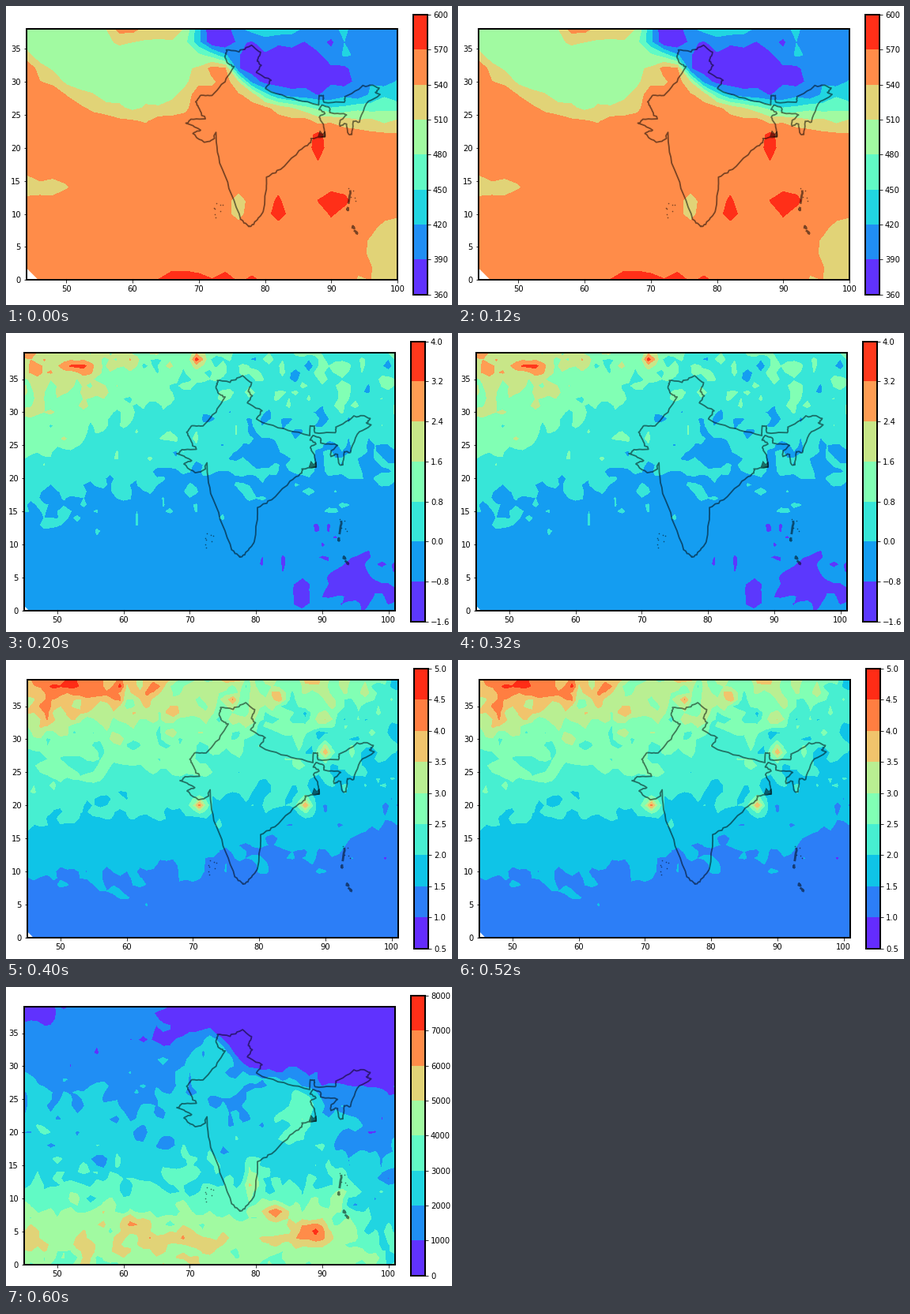
Write a matplotlib script that moves like this. It is 564x379 px and loops after 0.8 s.

```python
import numpy as np
import matplotlib.pyplot as plt
from matplotlib.animation import FuncAnimation

W, H, DPI = 564, 379, 72
PX_PER_DEG = 8.375

plt.rcParams.update({"font.family": "DejaVu Sans", "font.size": 10,
                     "axes.linewidth": 2})

# Key border vertices as (lon, lat).
NORTH = [
    (68.2, 23.7), (68.8, 24.3), (71.0, 24.4), (70.0, 25.9), (69.6, 27.0),
    (70.3, 28.0), (72.0, 27.9), (73.9, 30.0), (75.3, 32.3), (74.3, 32.8),
    (74.0, 33.8), (74.2, 34.8), (76.0, 34.6), (78.0, 35.5), (79.4, 34.4),
    (78.8, 33.3), (79.4, 32.5), (78.7, 31.4), (80.9, 30.2), (80.1, 28.9),
    (84.1, 27.4), (88.1, 26.5), (88.2, 27.9), (88.8, 27.9), (88.9, 26.9)]
EAST = [
    (92.0, 26.9), (92.1, 27.7), (94.6, 29.2), (96.2, 29.5), (97.3, 29.0),
    (96.7, 28.4), (97.4, 28.0), (95.3, 26.7), (94.2, 23.9), (93.4, 24.0),
    (93.1, 22.1), (92.6, 22.0), (92.2, 23.7), (91.3, 23.2), (91.3, 24.1),
    (92.4, 25.0), (89.9, 25.3), (89.7, 26.1), (88.5, 26.5), (88.2, 25.8),
    (89.0, 25.2), (88.1, 24.6), (88.8, 23.6), (89.1, 21.7)]
SOUTH = [
    (87.0, 21.4), (86.8, 20.6), (85.2, 19.6), (82.3, 16.7), (80.3, 15.6),
    (80.1, 13.2), (79.8, 10.4), (79.0, 9.3), (78.1, 8.3), (77.5, 8.1),
    (76.5, 9.2), (74.6, 13.8), (72.9, 18.7), (72.5, 22.3), (72.2, 21.2),
    (70.8, 20.8), (69.1, 22.2), (70.3, 22.8), (68.2, 23.7)]


def step(a, centre, width):
    """Smooth rise from 0 to 1."""
    return 1 / (1 + np.exp(-(a - centre) / width))


def ridge(x):
    """Latitude of the mountain front."""
    return 26 + 8.5 * np.exp(-np.clip(x - 73.5, 0, None) / 5)


def bent_slope(distance, slope):
    """Climb north of a front, flatten out south of it."""
    return 2 + np.where(distance > 0, slope * distance,
                        np.maximum(.06 * distance, -.48))


# Base fields, measured in colour bands.
def upper_air(x, y):
    east = step(x, 70, 1.2)
    cold = east * step(y, ridge(x) - .3, .7 + .8 * step(x, 92, 2))
    mild = (1 - east) * step(y, 25.4 + .035 * (x - 60) ** 2, .8)
    return 6.5 - 2.1 * mild - cold * (5.9 - step(x + y, 124.5, .8))


def north_west_rise(x, y):
    front = 16.5 + 4.5 * step(x, 56, 4)
    slope = .042 + .1 * (1 - step(x, 66, 4))
    return bent_slope(np.minimum(y - front, 19), slope)


def north_rise(x, y):
    front = 10 + 4 * step(x, 74, 1.5) + 5 * step(x, 96, 2)
    return bent_slope(y - front, .125 - .03 * step(x, 92, 3))


def south_rise(x, y):
    profile = np.interp(y, (0, 4, 10, 16, 26, 39), (4.3, 4.7, 3.4, 2.5, 2, 1.3))
    return profile - 1.3 * step(x, 67, 2) * step(y, ridge(x) + 1, .6)


# Bumps are (lon, lat, height, width, depth); noise goes from south to north.
MAPS = [
    dict(box=(26, 29), lon=(44, 100), lat=(0, 38), cell=2, bar_x=515,
         scale=(360, 600, 8), base=upper_air, noise=(.17, .17, .3),
         corner=1.7, seed=4,
         bumps=[(61, 39, 2.2, 6, 3), (81, 39, 2.6, 5, 3), (72, 37, -2, 2, 3),
                (100, 4, -1, 6, 8), (46, 14, -1, 5, 2), (71, 0, .8, 10, 1.8),
                (91, 12, .7, 3.5, 2.5), (88, 20, .9, 1.2, 3),
                (76, 11, -1.1, 1.3, 2.2), (82, 11, .9, 1, 2.2)]),
    dict(box=(23, 25), lon=(45, 101), lat=(0, 39), cell=1, bar_x=512,
         scale=(-1.6, 4, 7), base=north_west_rise, noise=(.15, .25, .48),
         corner=.6, seed=7,
         bumps=[(96, 4, -.6, 15, 6.5), (53, 37, 1.6, 2.5, 1),
                (71, 38, 3, 1, 1), (88, 37, -2, 1, 1)]),
    dict(box=(27, 25), lon=(45, 101), lat=(0, 39), cell=1, bar_x=516,
         scale=(.5, 5, 9), base=north_rise, noise=(.08, .25, .7),
         corner=.8, seed=11,
         bumps=[(50, 38, 2, 10, 3.5), (71, 20, 4.3, 1, 1), (87, 20, 3.7, 1, 1),
                (76, 36, 3, 1, 1), (83, 36, 2.5, 1, 1), (90, 28, 3, 1, 1),
                (99, 12, -.8, .7, .7)]),
    dict(box=(23, 25), lon=(45, 101), lat=(0, 39), cell=1, bar_x=512,
         scale=(0, 8000, 8), base=south_rise, noise=(.45, .36, .2),
         corner=0, seed=3,
         bumps=[(88, 5, 1.6, 3.5, 2.5), (83, 8, 2.4, 1.5, 1.5),
                (61.5, 6, 2, 2, 1.5), (67, 3.5, .8, 5, 2), (45, 4, .9, 3, 2.5),
                (101, 5, -1.7, 6, 8), (101, 22, -.9, 9, 6),
                (86, 23, 1.6, 3.5, 4), (79.5, 13, 2, 1.3, 3),
                (73, 31, .8, 3, 3), (47, 38, -.8, 4, 2),
                (65, 34, -.7, 4, 1.5), (56, 30, -.4, 9, 4)]),
]


def rough_noise(shape, seed, blurred):
    noise = np.random.default_rng(seed).normal(size=shape)
    if blurred:
        p = np.pad(noise, 1, mode="wrap")
        p = (p[:-2] + 4 * p[1:-1] + p[2:]) / 6
        noise = (p[:, :-2] + 4 * p[:, 1:-1] + p[:, 2:]) / 3
    return noise


def make_field(m):
    lon = np.arange(m["lon"][0], m["lon"][1] + 1, m["cell"])
    lat = np.arange(m["lat"][0], m["lat"][1] + 1, m["cell"])
    x, y = np.meshgrid(lon, lat)
    z = m["base"](x, y)
    for cx, cy, height, sx, sy in m["bumps"]:
        z += height * np.exp(-((x - cx) / sx) ** 2 - ((y - cy) / sy) ** 2)
    z += (rough_noise(z.shape, m["seed"], m["cell"] == 1)
          * np.interp(y, (0, 20, 38), m["noise"]))
    return lon, lat, np.clip(z, .04, m["scale"][2] - .04)


def rough_path(points, rng, pieces=5, jitter=.06):
    """Subdivide a polyline and shake the vertices."""
    points = np.array(points)
    t = np.linspace(0, len(points) - 1, (len(points) - 1) * pieces + 1)
    path = np.column_stack([np.interp(t, np.arange(len(points)), c)
                            for c in points.T])
    return path + rng.normal(0, jitter, path.shape)


def draw_border(ax):
    rng = np.random.default_rng(1)
    ink = dict(color="black", alpha=.52)
    ax.plot(*rough_path(NORTH + EAST + SOUTH, rng).T, lw=1.8, **ink)
    ax.fill([88.0, 88.3, 88.7, 89.1, 89.1], [21.7, 22.6, 22.1, 22.5, 21.6],
            lw=.5, **ink)
    for start, end in [((92.9, 13.5), (92.7, 11.6)), ((92.5, 10.8), (92.5, 10.6)),
                       ((93.3, 8.2), (93.5, 7.9)), ((93.7, 7.3), (93.9, 7.0))]:
        ax.plot(*rough_path([start, end], rng).T, lw=2.8, **ink)
    for lon, lat, count in [(72.8, 10.5, 8), (93.4, 13, 5)]:
        ax.plot(rng.normal(lon, .45, count), rng.normal(lat, .9, count), "o",
                ms=1.6, mew=0, **ink)


def pixel_axes(x, y, w, h):
    return fig.add_axes([x / W, 1 - (y + h) / H, w / W, h / H])


def draw_map(m):
    (left, top), (west, east), (south, north) = m["box"], m["lon"], m["lat"]
    ax = pixel_axes(left, top, (east - west) * PX_PER_DEG,
                    (north - south) * PX_PER_DEG)
    low, high, bands = m["scale"]
    levels = np.round(np.linspace(low, high, bands + 1), 6) + 0.0
    lon, lat, z = make_field(m)
    filled = ax.contourf(lon, lat, low + z * (high - low) / bands,
                         levels=levels, cmap="rainbow")
    if m["corner"]:
        c = m["corner"]
        ax.fill([west, west + c, west], [south, south, south + c], color="white")
    draw_border(ax)
    ax.set(xlim=m["lon"], ylim=m["lat"], xticks=range(50, 101, 10),
           yticks=range(0, 36, 5))

    bar_ax = pixel_axes(m["bar_x"], 10.75, 18, 355)
    bar = fig.colorbar(filled, cax=bar_ax, ticks=levels)
    bar.outline.set_linewidth(2)
    return ax, bar_ax


fig = plt.figure(figsize=(W / DPI, H / DPI), dpi=DPI, facecolor="white")
panels = [draw_map(m) for m in MAPS]


def update(index):
    for i, panel in enumerate(panels):
        for ax in panel:
            ax.set_visible(i == index)
    return []


update(0)
anim = FuncAnimation(fig, update, frames=len(panels), interval=200,
                     repeat=True, repeat_delay=0, blit=False)
plt.show()
```
